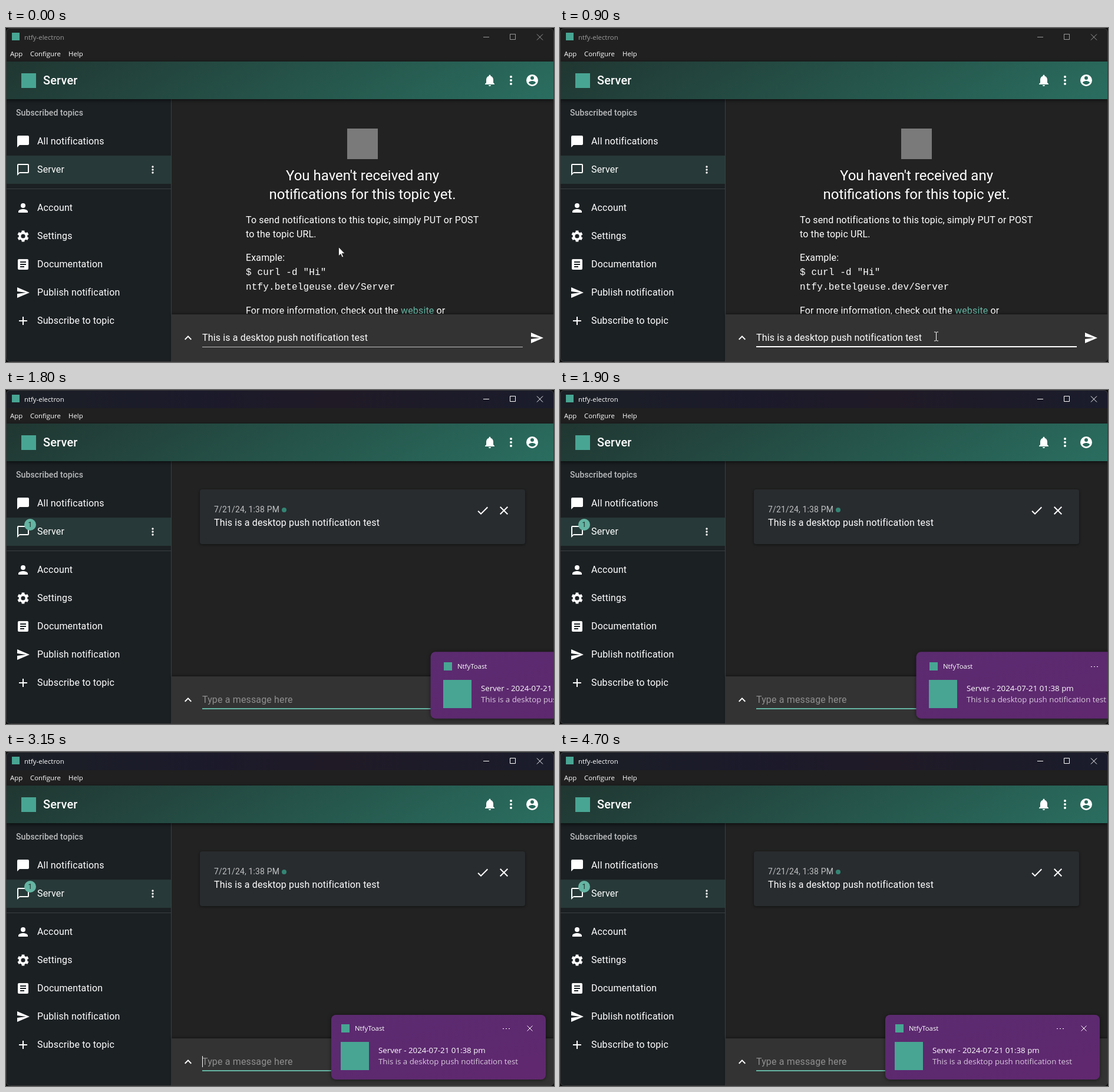
An HTML page that plays this animation: 930 by 568 pixels, repeating every 4.95 s.

```html
<!DOCTYPE html>
<html lang="en">
<head>
<meta charset="utf-8">
<title>Desktop push notification</title>
<style>
  html, body { margin: 0; width: 100%; height: 100%; overflow: hidden; background: #0c0c0c; }
  svg { display: block; }
  text { font: 16px Roboto, sans-serif; letter-spacing: .15px; fill: #fff; white-space: pre; }
  .system text { font: 11.4px "Open Sans", sans-serif; letter-spacing: 0; }
  .system .body { font-size: 13.3px; }
  .heading { font-size: 24px; letter-spacing: 0; text-anchor: middle; }
  .code { font-family: "Liberation Mono", monospace; }
  .line { fill: none; stroke: #fff; }
  .logo { fill: #48a593; }
  .muted { fill: #fff; fill-opacity: .7; }
  .icons { fill: #fff; }
</style>
</head>
<body>
<svg width="930" height="568" viewBox="0 0 930 568">
  <defs>
    <linearGradient id="headerFill" gradientUnits="userSpaceOnUse" x1="335" y1="-136" x2="595" y2="314">
      <stop stop-color="#203631"/><stop offset="1" stop-color="#2a6e60"/>
    </linearGradient>
    <linearGradient id="titleFill">
      <stop stop-color="#1b1f25"/><stop offset=".35" stop-color="#1b1a2b"/>
      <stop offset=".6" stop-color="#201a26"/><stop offset="1" stop-color="#1a1c2c"/>
    </linearGradient>
    <linearGradient id="toastFill" x2="1" y2="1">
      <stop stop-color="#5b2b70"/><stop offset=".6" stop-color="#5d296f"/><stop offset="1" stop-color="#61286f"/>
    </linearGradient>
    <clipPath id="windowShape"><rect width="930" height="568" rx="7"/></clipPath>
    <path id="send" d="M2 21 23 12 2 3v7l15 2-15 2z"/>
    <path id="more" d="M12 8a2 2 0 1 0 0-4 2 2 0 0 0 0 4zm0 2a2 2 0 1 0 0 4 2 2 0 0 0 0-4zm0 6a2 2 0 1 0 0 4 2 2 0 0 0 0-4z"/>
  </defs>

  <g clip-path="url(#windowShape)">
    <rect width="930" height="568" fill="#202020"/>
    <rect y="121" x="281" width="649" height="447" fill="#222"/>

    <g id="emptyTopic">
      <rect x="579" y="171" width="52" height="52" fill="#7a7a7a"/>
      <text class="heading" x="605" y="259">You haven't received any</text>
      <text class="heading" x="605" y="291">notifications for this topic yet.</text>
      <text x="407" y="332">To send notifications to this topic, simply PUT or POST</text>
      <text x="407" y="356">to the topic URL.</text>
      <text x="407" y="396">Example:</text>
      <text class="code" x="407" y="420">$ curl -d "Hi"</text>
      <text class="code" x="407" y="445">ntfy.betelgeuse.dev/Server</text>
      <text x="407" y="486">For more information, check out the <tspan fill="#65b5a3">website</tspan> or</text>
    </g>

    <g id="card">
      <rect x="329" y="169" width="552" height="93" rx="4" fill="#282c2f" style="filter:drop-shadow(0 1px 2px #0008)"/>
      <text class="muted" x="353" y="208" style="font-size:14px">7/21/24, 1:38 PM</text>
      <circle cx="472" cy="204" r="4" fill="#338574"/>
      <text x="353" y="231">This is a desktop push notification test</text>
      <g class="icons">
        <path transform="translate(797 193)" d="M9 16.17 4.83 12l-1.42 1.41L9 19 21 7l-1.41-1.41z"/>
        <path class="line" stroke-width="2" d="m838.7 198.7 12.6 12.6m0-12.6-12.6 12.6"/>
      </g>
    </g>

    <!-- Sidebar -->
    <rect y="121" width="281" height="447" fill="#1b2023"/>
    <rect y="217" width="280" height="48" fill="#273938"/>
    <path class="line" stroke-opacity=".14" d="M0 273.5h280M280.5 121v447"/>
    <text class="muted" x="17" y="149" style="font-size:14px;font-weight:500;letter-spacing:.1px">Subscribed topics</text>
    <text x="53" y="198">All notifications</text>
    <text x="53" y="246">Server</text>
    <text x="53" y="311">Account</text>
    <text x="53" y="359">Settings</text>
    <text x="53" y="407">Documentation</text>
    <text x="53" y="455">Publish notification</text>
    <text x="53" y="503">Subscribe to topic</text>
    <g class="icons">
      <path transform="translate(17 181)" d="M20 2H4a2 2 0 0 0-2 2v18l4-4h14a2 2 0 0 0 2-2V4a2 2 0 0 0-2-2z"/>
      <path transform="translate(17 229)" d="M20 2H4a2 2 0 0 0-2 2v18l4-4h14a2 2 0 0 0 2-2V4a2 2 0 0 0-2-2zm0 14H6l-2 2V4h16z"/>
      <use href="#more" transform="translate(239 231) scale(.833)"/>
      <path transform="translate(17 294)" d="M12 12a4 4 0 1 0 0-8 4 4 0 0 0 0 8zm0 2c-2.67 0-8 1.34-8 4v2h16v-2c0-2.66-5.33-4-8-4z"/>
      <g class="line" transform="translate(29 354)">
        <circle r="5.5" stroke-width="3.8"/>
        <path stroke-width="4.8" d="M0-9.6V-5M0 5v4.6M8.3-4.8 4.3-2.5M-4.3 2.5l-4 2.3M8.3 4.8l-4-2.3M-4.3-2.5l-4-2.3"/>
      </g>
      <path transform="translate(17 390)" d="M19 3H5a2 2 0 0 0-2 2v14a2 2 0 0 0 2 2h14a2 2 0 0 0 2-2V5a2 2 0 0 0-2-2zm-5 14H7v-2h7zm3-4H7v-2h10zm0-4H7V7h10z"/>
      <use href="#send" x="17" y="438"/>
      <path transform="translate(17 486)" d="M19 13h-6v6h-2v-6H5v-2h6V5h2v6h6z"/>
    </g>
    <g id="badge">
      <circle r="10" fill="#65b5a3"/>
      <text y="4" text-anchor="middle" style="font-size:12px;fill:#1d2a27">1</text>
    </g>

    <!-- Header -->
    <rect y="57" width="930" height="64" fill="url(#headerFill)" style="filter:drop-shadow(0 2px 3px #0009)"/>
    <rect class="logo" x="26" y="77" width="25" height="25"/>
    <text x="63" y="96" style="font-size:20px;font-weight:500">Server</text>
    <g class="icons">
      <path transform="translate(809 77)" d="M12 22a2 2 0 0 0 2-2h-4a2 2 0 0 0 2 2zm6-6v-5c0-3.07-1.64-5.64-4.5-6.32V4a1.5 1.5 0 0 0-3 0v.68C7.63 5.36 6 7.92 6 11v5l-2 2v1h16v-1z"/>
      <use href="#more" x="845" y="77"/>
      <path transform="translate(881 77)" d="M12 2a10 10 0 1 0 0 20 10 10 0 0 0 0-20zm0 3a3 3 0 1 1 0 6 3 3 0 0 1 0-6zm0 14.2c-2.5 0-4.71-1.28-6-3.22.03-1.99 4-3.08 6-3.08 1.99 0 5.97 1.09 6 3.08-1.29 1.94-3.5 3.22-6 3.22z"/>
    </g>

    <!-- Title and menu -->
    <rect id="titleBar" width="930" height="31" fill="url(#titleFill)"/>
    <rect class="logo" x="10" y="8" width="13" height="13"/>
    <g class="system">
      <g id="titleItems">
        <text x="31" y="20">ntfy-electron</text>
        <path class="line" d="M810 15.5h10M855.5 10.5h9v9h-9zM901 10.5l10 10m0-10-10 10"/>
      </g>
      <text x="7" y="48">App</text>
      <text x="41" y="48">Configure</text>
      <text x="106" y="48">Help</text>
    </g>

    <!-- Message bar -->
    <rect x="281" y="487" width="649" height="81" fill="#333" style="filter:drop-shadow(0 -1px 2px #0007)"/>
    <g class="icons">
      <path transform="translate(297 515)" d="M7.41 15.41 12 10.83l4.59 4.58L18 14l-6-6-6 6z"/>
      <use href="#send" x="889" y="515"/>
    </g>
    <text id="message" x="333" y="532"></text>
    <rect id="caret" y="517" width="1" height="19" fill="#fff"/>
    <rect id="underline" x="333" width="544" fill="#fff"/>
    <rect id="focusLine" y="541" height="2" fill="#65b5a3"/>
    <rect x=".5" y=".5" width="929" height="567" rx="7" fill="none" stroke="#3a3a3a"/>
  </g>

  <g id="toast" class="system">
    <rect id="toastBack" x="552" y="447" width="364" height="110" rx="8" fill="url(#toastFill)" style="filter:drop-shadow(0 1px 3px #0008)"/>
    <rect class="logo" x="569" y="463" width="14" height="14"/>
    <text x="592" y="474">NtfyToast</text>
    <path class="line" stroke="#ddd" d="M843 470.5h2m3 0h2m3 0h2M884.5 465.5l9 9m0-9-9 9"/>
    <rect class="logo" x="568" y="493" width="48" height="48"/>
    <text class="body" x="632" y="512">Server - 2024-07-21 01:38 pm</text>
    <text class="body" x="632" y="531" style="fill:#d8c9dd">This is a desktop push notification test</text>
  </g>

  <path id="arrow" d="M.5.5v15.2l3.5-3.3 2.4 5.5 2.3-1-2.4-5.3h4.7z" fill="#fff" stroke="#111" stroke-width=".8"/>
  <path id="textCursor" class="line" d="M-3.5-7.5h2.5l1 1 1-1h2.5M0-6.5v13M-3.5 7.5h2.5l1-1 1 1h2.5"/>
</svg>

<script>
const LOOP = 4950, STEP = 50;
const HOVER = 600, FOCUS = 1050, RECEIVED = 1400, CLEARED = 1450, TOAST = 1700;
const el = {};
document.querySelectorAll('svg [id]').forEach(node => el[node.id] = node);

const progress = (t, start, duration) => Math.min(1, Math.max(0, (t - start) / duration));
const mix = (a, b, p) => a + (b - a) * p;
const smooth = p => p * p * (3 - 2 * p);
const easeOut = (p, power = 3) => 1 - (1 - p) ** power;
const set = (node, attributes) => {
  for (const name in attributes) node.setAttribute(name, attributes[name]);
};
const show = (node, visible) => { node.style.display = visible ? '' : 'none'; };

function drawCursor(t) {
  const p = smooth(progress(t, 0, 850) ** .55);
  const x = Math.round(mix(564, 638, p)) - (t >= 1000 ? 1 : 0);
  const y = Math.round(mix(372, 524, p));
  set(el.arrow, { transform: `translate(${x} ${y})` });
  set(el.textCursor, { transform: `translate(${x + .5} ${y + .5})` });
  show(el.arrow, t < HOVER);
  show(el.textCursor, t >= HOVER && t < CLEARED);
}

function drawField(t) {
  const cleared = t >= CLEARED, hovered = t >= HOVER;
  el.message.textContent = cleared ? 'Type a message here' : 'This is a desktop push notification test';
  set(el.message, { 'fill-opacity': cleared ? .45 : 1 });
  set(el.caret, { x: cleared ? 333 : 613 });
  show(el.caret, t >= FOCUS && Math.floor((t - 1025) / 525) % 2 === 0);
  set(el.underline, {
    y: hovered ? 541 : 542,
    height: hovered ? 2 : 1,
    opacity: mix(.7, 1, progress(t, HOVER, 200))
  });
  const width = 544 * easeOut(progress(t, FOCUS, 200));
  set(el.focusLine, { x: 605 - width / 2, width });
}

function drawToast(t) {
  const offset = 378 * (1 - easeOut(progress(t, TOAST, 400), 2.7));
  const scale = 1 + .03 * Math.min(1, offset / 58);
  set(el.toast, { transform: `translate(${Math.round(offset)} 0)` });
  set(el.toastBack, { transform: `translate(734 502) scale(${scale}) translate(-734 -502)` });
  show(el.toast, t >= TOAST);
}

function draw(now) {
  const t = Math.floor((now % LOOP) / STEP) * STEP;
  const focus = progress(t, FOCUS, 200);
  set(el.titleBar, { opacity: focus });
  set(el.titleItems, { opacity: mix(.55, 1, focus) });
  show(el.emptyTopic, t < RECEIVED);
  show(el.card, t >= RECEIVED);
  set(el.badge, { transform: `translate(41 229) scale(${smooth(progress(t, RECEIVED, 225))})` });
  drawCursor(t);
  drawField(t);
  drawToast(t);
}

const begin = performance.now();
function frame() {
  draw(performance.now() - begin);
  requestAnimationFrame(frame);
}
frame();
</script>
</body>
</html>
```
